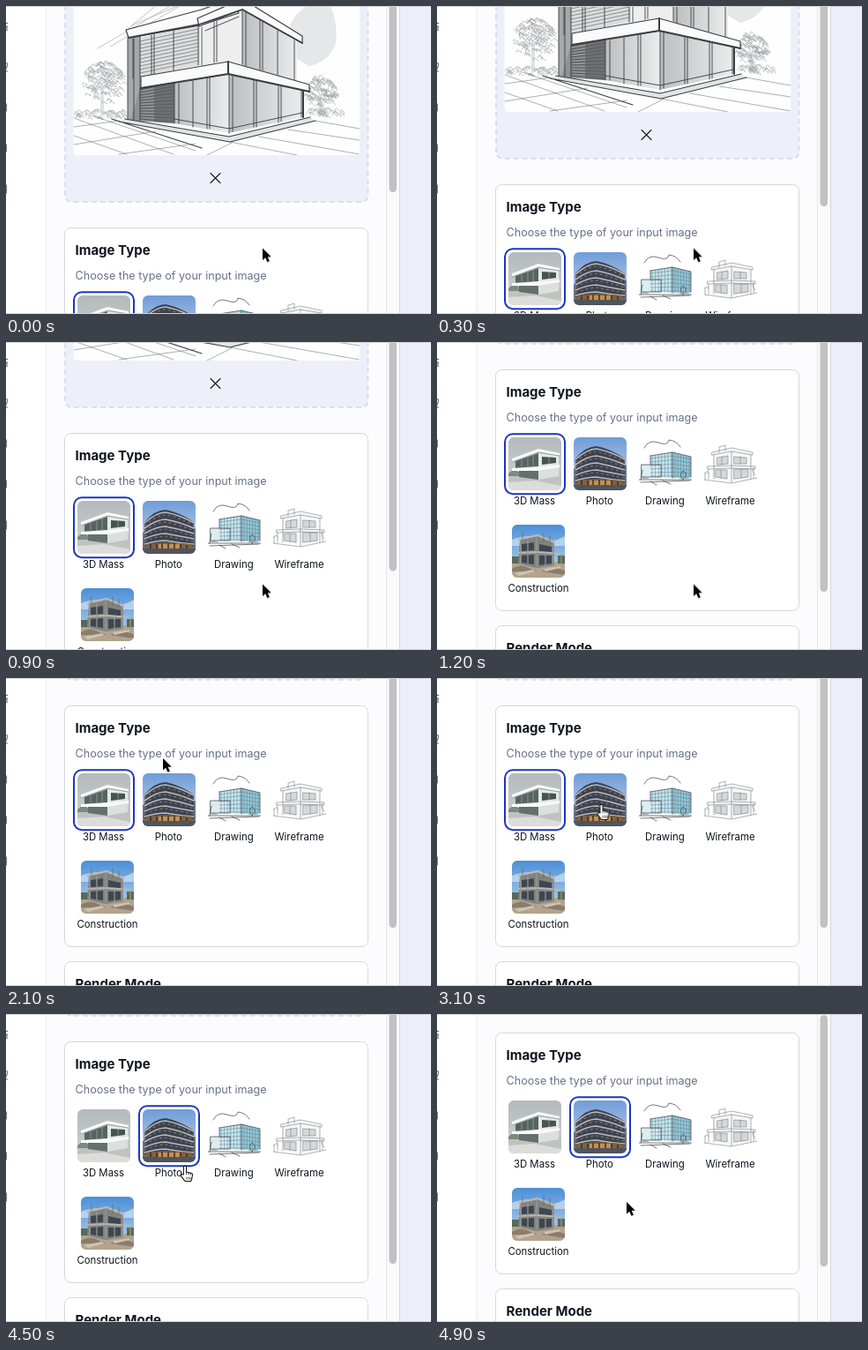
These frames come from a looping animation (482x349 px, 5 s). An HTML page:

```html
<!DOCTYPE html>
<html lang="en">
<head>
<meta charset="utf-8">
<title>Image type picker</title>
<style>
@property --y { syntax: "<number>"; inherits: true; initial-value: 220; }
html, body { margin: 0; width: 100%; height: 100%; overflow: hidden; background: #fff; }
svg { display: block; width: 482px; height: 349px; animation: scroll 5s step-end infinite; }
text { font-family: Inter, "Open Sans", sans-serif; fill: #11131f; }
.title { font-size: 15px; font-weight: 650; }
.hint { font-size: 12.6px; fill: #667089; }
.label { font-size: 11.4px; text-anchor: middle; }
.card { fill: #fff; stroke: #d6d7dc; }
.ring { fill: none; stroke: #1a36c0; stroke-width: 2; }
.ink { fill: none; stroke: #3c3e41; stroke-linecap: round; stroke-linejoin: round; }
.pale { stroke: #9c9ea1; stroke-width: .6; }
.slab { fill: #fafafa; stroke-width: 1.2; }

#page { transform: translate(0, calc(var(--y) * 1px)); }
#bar { transform: translate(0, calc(var(--y) * -.327px)); }
#mass { animation: off 5s step-end infinite; }
#photo { animation: on 5s step-end infinite; }
#cursor { animation: move 5s step-end infinite; }
#arrow { animation: arrow 5s step-end infinite; }
#hand { animation: hand 5s step-end infinite; }

@keyframes scroll {
  0% { --y: 220 } 2% { --y: 209 } 4% { --y: 190 } 6% { --y: 171 } 8% { --y: 160 }
  10% { --y: 155 } 14% { --y: 150 } 16% { --y: 118 } 18% { --y: 72 } 20% { --y: 34 }
  22% { --y: 9 } 24% { --y: 0 } 96% { --y: -3 } 98%, to { --y: -10 }
}
@keyframes off { 0% { opacity: 1 } 78% { opacity: .65 } 80% { opacity: .2 } 82%, to { opacity: 0 } }
@keyframes on { 0% { opacity: 0 } 78% { opacity: .35 } 80% { opacity: .8 } 82%, to { opacity: 1 } }
@keyframes arrow { 0% { opacity: 1 } 44% { opacity: 0 } 94%, to { opacity: 1 } }
@keyframes hand { 0% { opacity: 0 } 44% { opacity: 1 } 94%, to { opacity: 0 } }
@keyframes move {
  0% { transform: translate(291px, 274.5px) }
  32% { transform: translate(287px, 260px) }
  34% { transform: translate(270px, 217px) }
  36% { transform: translate(241px, 163px) }
  38% { transform: translate(208px, 117px) }
  40% { transform: translate(185px, 95px) }
  42% { transform: translate(178px, 91px) }
  44% { transform: translate(197px, 108px) }
  46% { transform: translate(240px, 122px) }
  48% { transform: translate(267px, 135px) }
  50% { transform: translate(254px, 142px) }
  52% { transform: translate(220px, 138px) }
  54% { transform: translate(198px, 128px) }
  62% { transform: translate(186.5px, 143px) }
  86% { transform: translate(190px, 151px) }
  88% { transform: translate(198px, 166px) }
  90% { transform: translate(203px, 172px) }
  92% { transform: translate(207px, 186px) }
  94% { transform: translate(211px, 200px) }
  96% { transform: translate(214px, 210px) }
  98%, to { transform: translate(215px, 213px) }
}
</style>
</head>
<body>
<svg viewBox="0 0 482 349">
  <defs>
    <clipPath id="sheet"><rect x="76.5" y="-60" width="324.5" height="229" rx="4"/></clipPath>
    <clipPath id="tile"><rect width="60" height="60" rx="6"/></clipPath>
    <linearGradient id="haze" x2="0" y2="1"><stop stop-color="#b3babd"/><stop offset="1" stop-color="#cfd2d2"/></linearGradient>
    <linearGradient id="dusk" x2="0" y2="1"><stop stop-color="#6f9cd8"/><stop offset="1" stop-color="#d3dbe8"/></linearGradient>
    <linearGradient id="day" x2="0" y2="1"><stop stop-color="#4c8fd6"/><stop offset="1" stop-color="#c3d9ec"/></linearGradient>
    <linearGradient id="glass" x2="1"><stop stop-color="#bcbec0"/><stop offset="1" stop-color="#ececed"/></linearGradient>
  </defs>

  <!-- window -->
  <rect x="45" width="387" height="349" fill="#fcfcfe"/>
  <rect x="45" width="1" height="349" fill="#ececf0"/>
  <rect x="431" width="15" height="349" fill="#fafafa"/>
  <rect x="431" width="1" height="349" fill="#e6e6e9"/>
  <rect x="446" width="36" height="349" fill="#eceff9"/>
  <rect x="446" width="1" height="349" fill="#d4d6de"/>
  <path class="ink" d="M0 19.5h1.5M0 23h1.5q-1 1-.5 5M0 65q2-1.5 1.5 1.5T0 71.5M0 74h1.5M.3 111v8M.3 157v8M.3 203v9" stroke-width=".9"/>
  <rect id="bar" x="434.5" y="-2" width="8.5" height="285" rx="4.2" fill="#c1c1c3"/>

  <g id="page">
    <!-- upload area -->
    <g transform="translate(0 -220)">
      <rect x="67" y="-80" width="343.5" height="302" rx="7" fill="#edf0f9" stroke="#d5d9e5" stroke-width="1.6" stroke-dasharray="6 4"/>
      <g clip-path="url(#sheet)">
        <rect x="76" y="-60" width="326" height="230" fill="#fefefe"/>
        <path d="M322 22Q334-6 366-4Q377 18 374 42Q368 62 344 68L330 60Z" fill="#e6e7e8"/>
        <path id="trees" class="ink pale"/>
        <path class="ink pale" d="M104 48L190-2M118 46L204-4M137 27L172-2M142 22L214-8"/>

        <!-- upper floor -->
        <path d="M144 37L220 21V67L144 82Z" fill="#dcdddf"/>
        <path d="M222 24L268 4V66L222 68Z" fill="#eeeeef"/>
        <path d="M268 4L330 40V88L268 68Z" fill="url(#glass)"/>
        <path d="M138 36L152 34V128L138 130Z" fill="#a6a8aa"/>
        <path id="boards" class="ink" stroke-width=".5"/>
        <path class="ink" stroke-width=".9" d="M144 37V82M165 33V78M168 32V77M190 28V73M218 22V67M222 24V67M236 18V64M239 17V63M268 4V66M272 7V68M288 16V72M291 18V73M308 28V78M327 39V85M226 28L264 12"/>
        <path class="ink slab" d="M136 27L222 4L256-8L264 8L220 22L139 36Z"/>
        <path class="ink slab" d="M217 14L268-8L336 34V42L268 4L219 23Z"/>
        <path class="ink" stroke-width="1.8" d="M139 36L219 21L268 4L336 42"/>

        <!-- ground floor -->
        <path d="M152 93L191 84V133L141 130Z" fill="#909395"/>
        <path id="siding" class="ink" stroke-width=".8"/>
        <path d="M168 90L191 84V133L168 131Z" fill="#606366" opacity=".7"/>
        <path d="M191 88L253 75V144L191 133Z" fill="url(#glass)"/>
        <path d="M253 75L336 91V126L253 144Z" fill="url(#glass)"/>
        <path class="ink" stroke-width=".9" d="M138 36V130M145 37V130M152 34V130M191 86V133M196 88V133M212 85V137M228 80V139M231 80V139M253 75V144M257 76V142M281 81V137M284 82V137M309 86V132M312 87V131M335 91V126M191 128L253 139L336 121"/>
        <path class="ink slab" d="M153 80L252 63L344 89V97L252 77L153 93Z"/>
        <path class="ink" stroke-width="2" d="M153 93L252 77L344 97M252 63V77M337 97V126"/>

        <!-- terrace -->
        <path d="M135 128L253 148L345 126L350 130L254 154L128 131Z" fill="#e3e4e5"/>
        <path class="ink" stroke-width="1.2" d="M135 128L253 148L345 126M128 131L254 154L351 130M120 128L222 161"/>
        <path class="ink" stroke-width=".6" style="stroke:#77797c" d="M77 127L190 168M97 124L215 164M77 147L137 168M170 142L77 157M215 156L128 168M256 155L228 169M287 148L401 168M350 130L401 139M320 140L401 152M254 154L330 169M77 137l52-7"/>
      </g>
      <path class="ink" style="stroke:#17181d" stroke-width="1.1" d="M232 189.500l11 11m0-11l-11 11"/>
    </g>

    <!-- image type -->
    <rect class="card" x="66.5" y="31.5" width="344" height="273" rx="7"/>
    <text class="title" x="78.5" y="62">Image Type</text>
    <text class="hint" x="78.5" y="90">Choose the type of your input image</text>

    <g transform="translate(81 108)" clip-path="url(#tile)">
      <rect width="60" height="60" fill="url(#haze)"/>
      <path d="M0 41L26 38L60 41V60H0Z" fill="#bfc2bf"/>
      <path d="M0 41L6 36L13 40V44H0Z" fill="#7f8a7a"/>
      <path d="M8 27L34 18V33L8 36Z" fill="#56645f"/>
      <path d="M34 18L57 21V31L34 33Z" fill="#e6e8e7"/>
      <path d="M38 22L54 23V29L38 31Z" fill="#46534f"/>
      <path d="M12 38H34V48L12 45Z" fill="#666f6f"/>
      <path d="M34 38L57 34V44L34 48Z" fill="#dcdfde"/>
      <path d="M4 24L34 13L58 18V21L34 17L4 28ZM4 35L34 33L58 31V34L34 38L4 38Z" fill="#f8f9f8"/>
      <path d="M4 28L34 17L58 21" fill="none" stroke="#7c8484" stroke-width=".7"/>
      <path d="M0 51L30 49L60 55V60H0Z" fill="#dcdddb"/>
      <path d="M15 25V35M22 23V34M28 20V34M46 22V30" stroke="#a0aaa7" stroke-width=".7"/>
    </g>

    <g transform="translate(155 108)" clip-path="url(#tile)">
      <rect width="60" height="60" fill="url(#dusk)"/>
      <path d="M0 36L8 32V56H0ZM53 34L60 31V56H53Z" fill="#6b7282"/>
      <path d="M2 24Q14 10 26 10Q42 13 58 24V53H2Z" fill="#3a4353"/>
      <path id="lights" fill="none" stroke="#8f7157" stroke-width="1.2" stroke-dasharray="3 3"/>
      <path id="floors" fill="none" stroke="#bcb9b9" stroke-width="1.6"/>
      <path d="M4 49L27 47L56 49V55H4Z" fill="#80613f"/>
      <path d="M18 49H42V55H18Z" fill="#c58f4e"/>
      <path d="M9 49v6M16 49v6M22 48v7M29 48v7M36 48v7M43 49v6M50 50v5" stroke="#34302f" stroke-width="1.5"/>
      <path d="M0 54H60V60H0Z" fill="#50545e"/>
    </g>

    <g transform="translate(229 108)" clip-path="url(#tile)">
      <rect width="60" height="60" fill="#fff"/>
      <path d="M13 21L38 17V46L13 44Z" fill="#c9e3eb"/>
      <path d="M38 17L59 22V45L38 46Z" fill="#98c5d5"/>
      <path d="M3 31H25V45H3Z" fill="#dbedf2"/>
      <path id="panes" class="ink" stroke-width=".5" style="stroke:#4f8396"/>
      <path class="ink" stroke-width=".7" d="M13 21L38 17L59 22V45M13 21V31M38 17V46M3 31H25V45H3ZM0 48H60M2 51L58 49M6 12q5-10 16-6t12-3q9 1 13 8M2 48l2-11M50 48q-5-6 0-10q7 4 0 10M13 50l7 4M27 49l9 4"/>
      <path d="M1 47Q6 42 12 47ZM45 47Q51 41 58 47Z" fill="#819d9d" opacity=".7"/>
    </g>

    <g transform="translate(303 108)" clip-path="url(#tile)">
      <rect width="60" height="60" fill="#fff"/>
      <path d="M11 17L31 13L53 18V47L31 51L9 47Z" fill="#f7f7f7"/>
      <path d="M15 23L27 21V30L15 31ZM34 22L48 23V30L34 30ZM34 36L50 36V45L34 47ZM13 37L26 37V47L13 45Z" fill="#d6d7d9"/>
      <path class="ink" stroke-width=".6" style="stroke:#7b7d80" d="M9 17L31 12L55 17V20L31 16L9 20ZM11 20V47M31 16V51M53 20V47M4 33L31 32L58 33V36L31 35L4 36ZM15 23L27 21V30L15 31ZM34 22L48 23V30H34ZM41 22V30M20 22V31M13 37H26V47L13 45ZM34 36H50V45L34 47ZM42 36V46M19 37V46M5 36V47M56 36V46M0 48L31 52L60 46M17 17V11L24 9V15M1 48V40M1 41q3-5 4 0M58 43q-5-5-2-9"/>
    </g>

    <g transform="translate(85 207)" clip-path="url(#tile)">
      <rect width="60" height="60" fill="url(#day)"/>
      <path d="M0 17Q18 10 32 16T60 13V24H0Z" fill="#e6edf2" opacity=".6"/>
      <path d="M0 42H60V60H0Z" fill="#b1a38e"/>
      <path d="M0 36H8V44H0ZM52 35H60V44H52Z" fill="#57695a"/>
      <path d="M9 17L29 13L48 21V46L28 49L7 44Z" fill="#828381"/>
      <path d="M11 22L25 20V29L11 30ZM31 22L45 25V31L31 30ZM11 35L25 34V45L11 43ZM31 35L45 35V44L31 46Z" fill="#3e4650"/>
      <path d="M7 17L29 12L49 20M7 32L28 31L57 33" fill="none" stroke="#b9b8b2" stroke-width="2.2"/>
      <path d="M10 17V45M28 13V48M47 21V46M56 33V46M38 32V47M18 17V44" stroke="#9b9a94" stroke-width="1.2"/>
      <path d="M36 9V20M43 12V21M12 9V17" stroke="#6e6a66" stroke-width=".8"/>
      <path d="M0 50Q10 43 21 50L29 53H0ZM34 53Q45 46 60 52V57Z" fill="#8b7c6b"/>
      <path d="M3 55L24 51L26 53L8 58ZM36 50L55 47V49L38 53Z" fill="#d0c4af"/>
    </g>

    <rect id="mass" class="ring" x="77" y="104.2" width="68" height="68" rx="9"/>
    <rect id="photo" class="ring" x="151" y="104.2" width="68" height="68" rx="9"/>
    <text class="label" x="110.5" y="184">3D Mass</text>
    <text class="label" x="184.3" y="184">Photo</text>
    <text class="label" x="258.3" y="184">Drawing</text>
    <text class="label" x="332.5" y="184">Wireframe</text>
    <text class="label" x="115" y="283">Construction</text>

    <rect class="card" x="66.5" y="321.5" width="344" height="120" rx="7"/>
    <text class="title" x="78.5" y="352">Render Mode</text>
  </g>

  <path d="M0 .5H482M0 348.5H482" stroke="#d0d1d5"/>

  <g id="cursor">
    <path id="arrow" d="M0 0V13.500L3.200 10.700L5.400 15.800L7.900 14.700L5.700 9.700H9.800Z" fill="#050505" stroke="#fff" stroke-width="2" paint-order="stroke"/>
    <g id="hand"><g transform="translate(-5 0) scale(1.05)" fill="#fff" stroke="#111" stroke-linejoin="round">
      <path d="M3.200 9.500V1.600a1.500 1.500 0 0 1 3 0V6.700l5.200 1.200a2 2 0 0 1 1.500 2.100L12.100 14l-1 2.700H5L1 11.700a1.400 1.400 0 0 1 2.200-2.200Z"/>
      <path d="M6.200 6.700v3M8.600 7.300v2.500M10.700 7.800v2.300M6.500 12v2.800M8.500 12v2.800M10.400 12v2.800" stroke-width=".7"/>
    </g></g>
  </g>
</svg>
<script>
const draw = (id, d) => document.getElementById(id).setAttribute('d', d);
const repeat = (n, fn) => Array.from({ length: n }, (_, i) => fn(i)).join('');

let seed = 7;
const rand = () => (seed = seed * 16807 % 2147483647) / 2147483647;

// Leaf curls scattered over a crown, above a forked trunk.
function tree(cx, cy, r) {
  const leaves = repeat(r * 6, () => {
    const a = rand() * Math.PI * 2, d = r * Math.sqrt(rand());
    const x = cx + d * Math.cos(a), y = cy + d * Math.sin(a);
    return `M${x} ${y}q${2 - rand() * 4}-4 3-1t2 ${rand() * 3}`;
  });
  return leaves + `M${cx - 1} ${cy + r * 1.5}V${cy}l${-r * .5} ${-r * .4}M${cx + 1} ${cy + r * 1.5}V${cy + 4}l${r * .5} ${-r * .5}`;
}
// Low foliage along a hedge line.
const hedge = (x, y, w) => repeat(w, () => `M${x + rand() * w} ${y - rand() * 9}q1-4 3-1t2 2`);

draw('trees', tree(109, 88, 24) + tree(356, 98, 18) + hedge(78, 128, 56) + hedge(340, 126, 40));
draw('boards', repeat(10, i => `M152 ${40 + i * 4}L218 ${26 + i * 4}`));
draw('siding', repeat(12, i => `M152 ${95 + i * 3}L190 ${87 + i * 4}`));

const floor = (i, dy) => {
  const side = 25 + i * 6 + dy, edge = 9 + i * 8 + dy;
  return `M2 ${side}Q16 ${edge + 4} 26 ${edge + 4}Q42 ${edge + 7} 58 ${side}`;
};
draw('floors', repeat(5, i => floor(i, 0)));
draw('lights', repeat(5, i => floor(i, 3)));

draw('panes',
  repeat(7, i => `M${15 + i * 3.6} ${20.5 - i * .6}V45`) +
  repeat(6, i => `M${41 + i * 3.2} ${17.8 + i * .8}V45`) +
  repeat(6, i => `M13 ${24 + i * 4}L38 ${21 + i * 4.6}L59 ${25 + i * 4}`));
</script>
</body>
</html>
```
